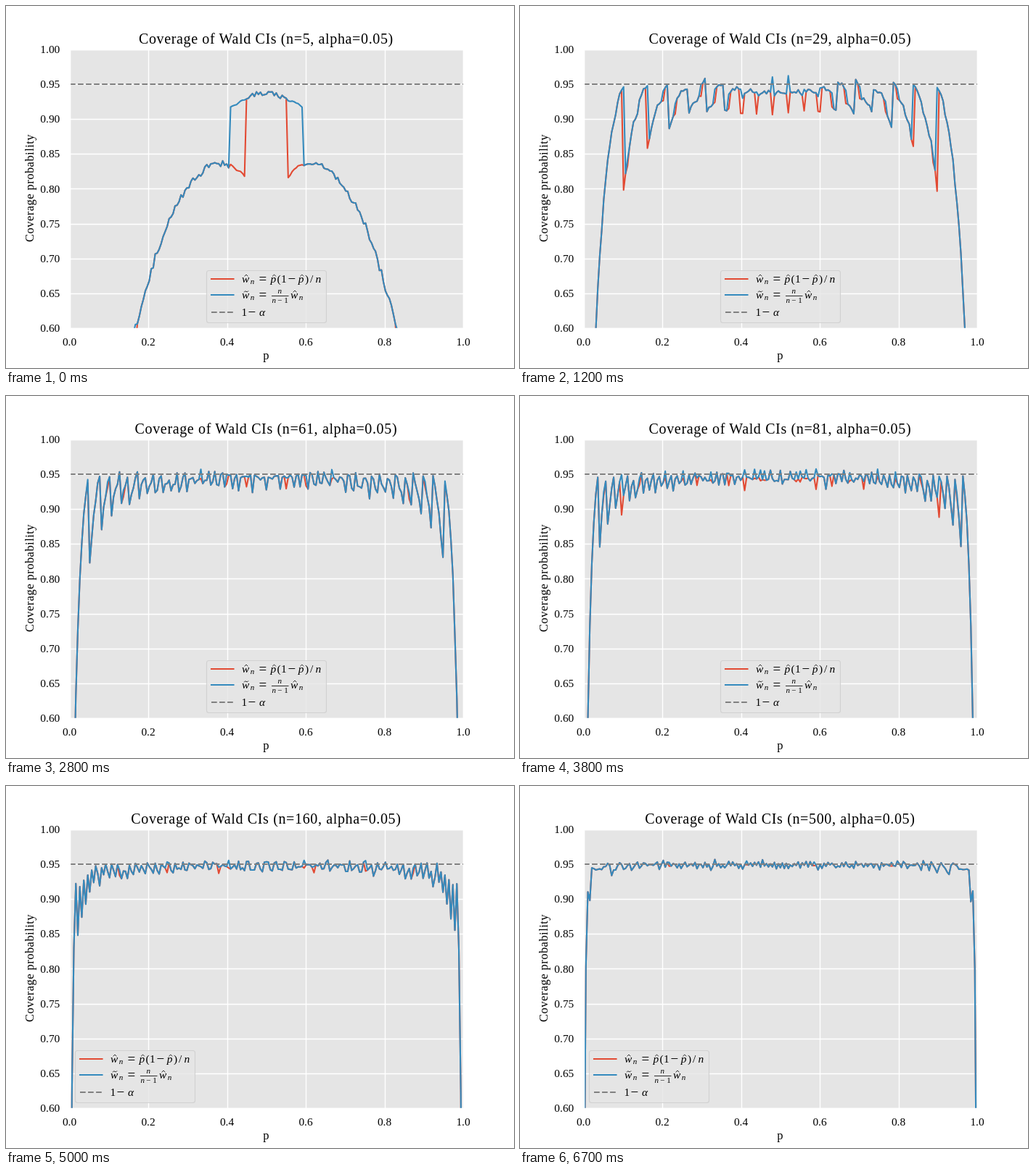
An HTML page that plays this animation: 700 px wide and 500 px high, repeating every 6800 ms.

```html
<!DOCTYPE html>
<html lang="en">
<head>
<meta charset="utf-8">
<title>Coverage of confidence intervals</title>
<style>
  html, body { margin: 0; width: 100%; height: 100%; overflow: hidden; background: #fff; }
  svg { display: block; width: 700px; height: 500px; }
  text { font-family: "Liberation Serif", "Noto Serif", serif; font-size: 15.4px; fill: #000; }
  .title { font-size: 20px; letter-spacing: 0.032em; }
  .label { font-size: 16.5px; letter-spacing: 0.028em; }
  .mid { text-anchor: middle; }
  .end { text-anchor: end; }
  .it { font-style: italic; }
  .op { font-size: 19px; }
  .small { font-size: 11px; }
  .line { fill: none; stroke-width: 2.08; stroke-linejoin: round; }
  .dash { stroke: #808080; stroke-dasharray: 7.708 3.333; }
  .thin { fill: none; stroke: #000; stroke-width: 0.8; }
</style>
</head>
<body>
<svg id="stage" viewBox="0 0 700 500"></svg>
<script>
const RED = '#E24A33', BLUE = '#348ABD';
const BOX = { left: 87.5, right: 630, top: 60, bottom: 445 };
const FRAME_MS = 100, FRAMES = 68;
const POINTS = 199, Z = 1.959964, TRIALS = 20000;

const stage = document.getElementById('stage');
const xOf = p => BOX.left + p * (BOX.right - BOX.left);
const yOf = c => BOX.bottom - (c - 0.6) / 0.4 * (BOX.bottom - BOX.top);

function add(parent, tag, attrs, text) {
  const node = document.createElementNS('http://www.w3.org/2000/svg', tag);
  for (const key in attrs) node.setAttribute(key, attrs[key]);
  if (text !== undefined) node.textContent = text;
  return parent.appendChild(node);
}

// Axes
const clip = add(add(stage, 'defs', {}), 'clipPath', { id: 'plot' });
const area = { x: BOX.left, y: BOX.top, width: BOX.right - BOX.left, height: BOX.bottom - BOX.top };
add(clip, 'rect', area);
add(stage, 'rect', { x: 88, y: 60, width: 542, height: 385, fill: '#E5E5E5' });

// Grid lines sit on pixel centres.
let grid = '';
for (let i = 0; i <= 5; i++) {
  const x = xOf(i / 5);
  grid += `M${Math.round(x) + 0.5} 60V445`;
  add(stage, 'text', { x, y: 469, class: 'mid' }, (i / 5).toFixed(1));
}
for (let i = 0; i <= 8; i++) {
  const y = BOX.bottom - i * (BOX.bottom - BOX.top) / 8;
  grid += `M88 ${Math.ceil(y - 0.5) + 0.5}H630`;
  add(stage, 'text', { x: 74.3, y: y + 5, class: 'end' }, (0.6 + i * 0.05).toFixed(2));
}
add(stage, 'path', { d: grid, fill: 'none', stroke: '#fff', 'stroke-width': 1.39 });

// Curves
const plot = add(stage, 'g', { 'clip-path': 'url(#plot)' });
const redCurve = add(plot, 'path', { class: 'line', stroke: RED });
const blueCurve = add(plot, 'path', { class: 'line', stroke: BLUE });
add(plot, 'path', { d: 'M88 108H630', class: 'line dash' });
add(stage, 'rect', { x: 88.5, y: 60.5, width: 542, height: 385, fill: 'none', stroke: '#fff', 'stroke-width': 1.39 });

// Labels
const title = add(stage, 'text', { x: 358.4, y: 52, class: 'title mid' });
add(stage, 'text', { x: 358.6, y: 488, class: 'label mid' }, 'p');
add(stage, 'text', { transform: 'translate(38 251.5) rotate(-90)', class: 'label mid' }, 'Coverage probability');

// Legend
const legend = add(stage, 'g', {});
add(legend, 'rect', {
  x: 0.5, y: 365.5, width: 165, height: 72, rx: 3,
  fill: '#E5E5E5', 'fill-opacity': 0.8, stroke: '#ccc', 'stroke-opacity': 0.8, 'stroke-width': 1.1
});
add(legend, 'path', { d: 'M7 377H37.5', class: 'line', stroke: RED, 'stroke-linecap': 'square' });
add(legend, 'path', { d: 'M7 399H37.5', class: 'line', stroke: BLUE, 'stroke-linecap': 'square' });
add(legend, 'path', { d: 'M7 423H37.5', class: 'line dash' });

const glyph = (x, y, text, cls = '') => add(legend, 'text', { x, y, class: cls }, text);
const operator = (x, y, text) => glyph(x, y + 1, text, 'op');
const hat = (x, y) => add(legend, 'path', { d: `M${x - 2.4} ${y}l2.4 -2.4l2.4 2.4`, class: 'thin' });
const tilde = (x, y) => add(legend, 'path', { d: `M${x - 3} ${y}q1.4 -2.6 3 -1t3 -1`, class: 'thin' });

function estimate(x, y, accent) {
  glyph(x, y, 'w', 'it');
  accent(x + 6, y - 8.6);
  glyph(x + 11.8, y + 2.3, 'n', 'it small');
}
function pHat(x, y) {
  glyph(x, y, 'p', 'it');
  hat(x + 5, y - 8.6);
}

estimate(49, 382, hat);
operator(72.4, 382, '=');
pHat(88.5, 382);
glyph(97.5, 382, '(');
glyph(103, 382, '1');
operator(112.4, 382, '\u2212');
pHat(126.8, 382);
glyph(136, 382, ')');
glyph(143, 382, '/');
glyph(150.5, 382, 'n', 'it');

estimate(49, 404, tilde);
operator(72.4, 404, '=');
glyph(98.6, 397, 'n', 'it small');
add(legend, 'path', { d: 'M90 400.5H113.5', class: 'thin' });
glyph(90.5, 410, 'n', 'it small');
glyph(98, 410, '\u2212', 'small');
glyph(107.3, 410, '1', 'small');
estimate(116, 404, hat);

glyph(48.5, 428, '1');
operator(57.6, 428, '\u2212');
glyph(73, 428, '\u03b1', 'it');

// Seeded normal deviates stand for the sampling noise of the simulation.
function normals(seed) {
  let state = seed * 7919;
  const uniform = () => {
    state = (state + 0x6D2B79F5) | 0;
    let t = Math.imul(state ^ (state >>> 15), 1 | state);
    t = (t + Math.imul(t ^ (t >>> 7), 61 | t)) ^ t;
    return ((t ^ (t >>> 14)) >>> 0) / 4294967296;
  };
  return () => Math.sqrt(-2 * Math.log(1 - uniform())) * Math.cos(2 * Math.PI * uniform());
}

// Probability that the interval around k/n, for k ~ Binomial(n, p), contains p.
function coverageCurves(n) {
  const logChoose = [0];
  for (let k = 1; k <= n; k++) logChoose[k] = logChoose[k - 1] + Math.log((n - k + 1) / k);
  const normal = normals(n);
  const paths = ['', ''];
  for (let i = 0; i < POINTS; i++) {
    const p = 0.001 + 0.998 * i / (POINTS - 1);
    const sums = [0, 0];
    for (let k = 1; k < n; k++) {
      const q = k / n, gap = Math.abs(q - p), spread = q * (1 - q);
      if (gap > Z * Math.sqrt(spread / (n - 1))) continue;
      const mass = Math.exp(logChoose[k] + k * Math.log(p) + (n - k) * Math.log(1 - p));
      sums[1] += mass;
      if (gap <= Z * Math.sqrt(spread / n)) sums[0] += mass;
    }
    const noise = normal();
    sums.forEach((c, j) => {
      const value = c + noise * Math.sqrt(Math.max(0, c * (1 - c)) / TRIALS);
      paths[j] += `${i ? 'L' : 'M'}${xOf(p).toFixed(2)} ${yOf(value).toFixed(2)}`;
    });
  }
  return paths;
}

const sampleSize = step => step < 47 ? 5 + 2 * step : 100 + 20 * (step - 47);
const cache = new Map();
let shown = -1;

function draw(time) {
  const step = Math.floor(time / FRAME_MS) % FRAMES;
  if (step === shown) return;
  shown = step;
  const n = sampleSize(step);
  if (!cache.has(n)) cache.set(n, coverageCurves(n));
  const [red, blue] = cache.get(n);
  redCurve.setAttribute('d', red);
  blueCurve.setAttribute('d', blue);
  title.textContent = `Coverage of Wald CIs (n=${n}, alpha=0.05)`;
  legend.setAttribute('transform', `translate(${n < 83 ? 276 : 95} 0)`);
}

const start = performance.now();
function tick() {
  draw(performance.now() - start);
  requestAnimationFrame(tick);
}
tick();
</script>
</body>
</html>
```
